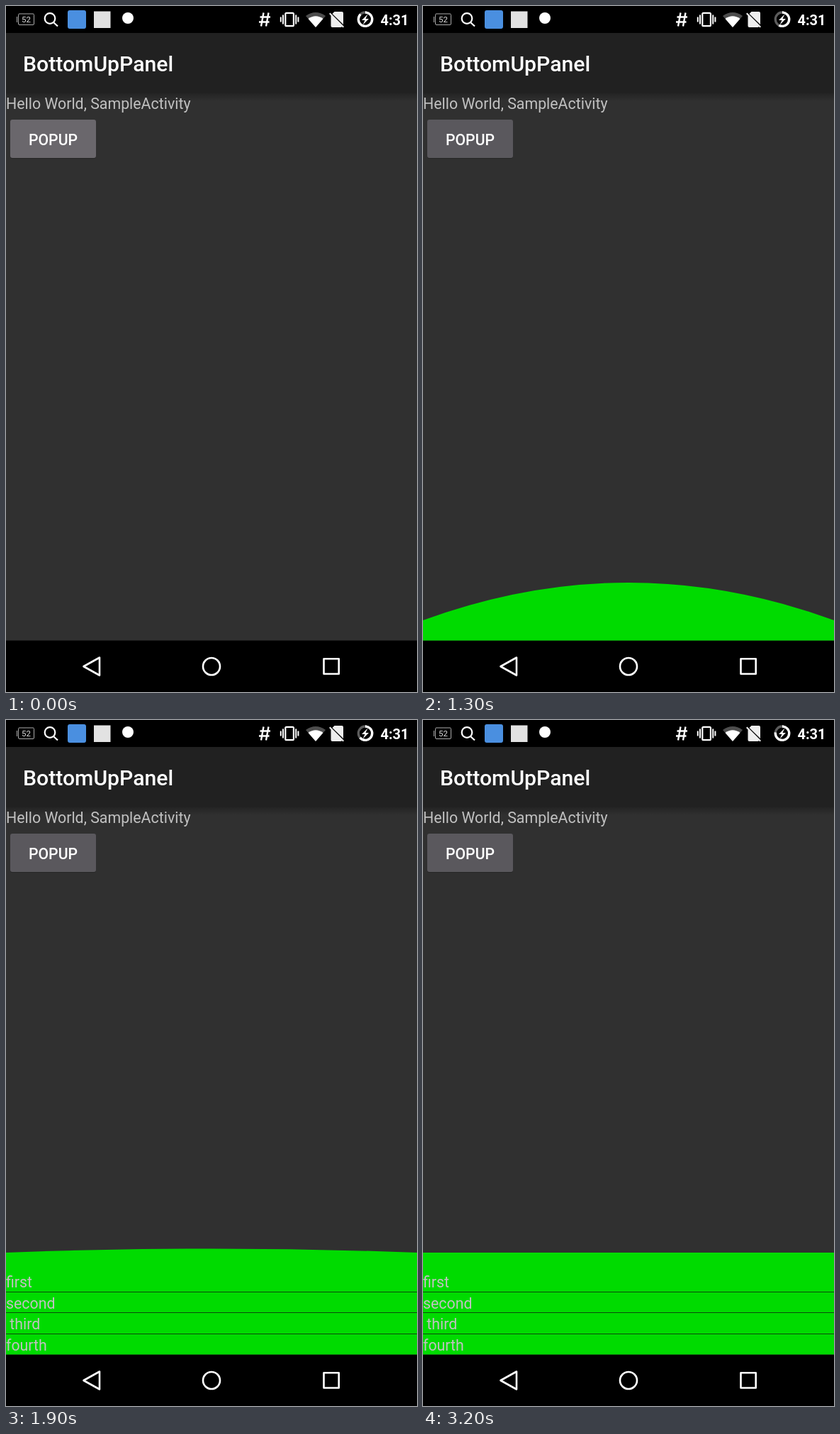
Recreate the animation shown at these times as an HTML page. Size 580 by 966 pixels, loop 3300 ms.

```html
<!DOCTYPE html>
<html lang="en">
<head>
<meta charset="utf-8">
<title>BottomUpPanel</title>
<style>
  html, body { margin: 0; width: 100%; height: 100%; overflow: hidden; background: #000; }
  svg { display: block; width: 580px; height: 966px; }
  text { font: 400 21.35px Roboto, sans-serif; fill: #c1c1c1; white-space: pre; }
  .medium { font-weight: 500; fill: #fff; }
  .title { font-size: 30.2px; }
  .label { font-size: 21.15px; }
  .clock { font-size: 20px; font-weight: 700; }
  .line { fill: none; stroke: #fff; }
  #button { animation: release 3.3s step-end infinite; }
  @keyframes release {
    0% { fill: #6a676c; }
    3.0303% { fill: #676569; }
    6.0606% { fill: #646266; }
    9.0909% { fill: #616062; }
    12.1212% { fill: #5e5d5f; }
    15.1515% { fill: #5b5b5b; }
    18.1818%, 100% { fill: #5a585d; }
  }
</style>
</head>
<body>
<svg viewBox="0 0 580 966">
  <defs>
    <linearGradient id="shade" x2="0" y2="1">
      <stop offset="0" stop-color="#242424"/>
      <stop offset="1" stop-color="#303030"/>
    </linearGradient>
    <clipPath id="content"><path d="M0 123H580V893.5H0z"/></clipPath>
  </defs>

  <rect width="580" height="966"/>
  <rect y="38" width="580" height="855.5" fill="#303030"/>
  <rect y="38" width="580" height="85" fill="#212121"/>
  <rect y="123" width="580" height="11" fill="url(#shade)"/>
  <text class="medium title" x="24" y="92">BottomUpPanel</text>
  <text x="0" y="145">Hello World, SampleActivity</text>
  <rect x="6" y="161" width="121" height="54" rx="3" fill="#262626"/>
  <rect id="button" x="6" y="160" width="121" height="54" rx="3"/>
  <text class="medium label" x="32" y="195.5">POPUP</text>

  <g clip-path="url(#content)">
    <g id="panel">
      <path id="sheet" fill="#00db00"/>
      <g id="rows"></g>
    </g>
  </g>

  <!-- status bar -->
  <rect class="line" x="17.5" y="11" width="22" height="15.5" rx="1.5" style="stroke:#aaa"/>
  <path class="line" d="M15.5 15v8" style="stroke:#aaa"/>
  <text x="28.5" y="23" text-anchor="middle" style="font-size:11.5px;fill:#ddd">52</text>
  <g class="line" stroke-width="2.2">
    <circle cx="62" cy="17.5" r="7.3"/>
    <path d="M67 23l6 5.5"/>
  </g>
  <rect x="87" y="6" width="26" height="26" rx="3" fill="#4a8fe0"/>
  <rect x="124" y="7.5" width="23.5" height="23.5" fill="#e2e2e2"/>
  <circle cx="172" cy="17" r="8" fill="#fff"/>
  <path class="line" stroke-width="2.4" d="M363.5 9.5l-3.5 19M370.5 9.5l-3.5 19M358.5 15.5h14.5M357 22.5h14.5"/>
  <rect class="line" stroke-width="2.2" x="394.3" y="9.8" width="11.6" height="18.4" rx="1.5"/>
  <path class="line" stroke-width="2" d="M391 12.5v13M387.8 15.5v7M409.2 12.5v13M412.4 15.5v7"/>
  <path d="M423 14Q437 4 451 14L437 30z" fill="#4d4d4d"/>
  <path d="M426.5 18Q437 10.5 447.5 18L437 30z" fill="#fff"/>
  <path d="M463.5 8H474Q476 8 476 10V26L460.5 11zM457.5 9.5L477 29l-1.5 1.5-1.5-1.500Q473.500 30 472.500 30H460.500Q458.500 30 458.500 28V13.500L456 11z" fill="#eee"/>
  <g class="line" stroke-width="3.3">
    <circle cx="507" cy="18.7" r="9.7" style="stroke:#5c5c5c"/>
    <circle id="charge" cx="507" cy="18.7" r="9.7" pathLength="100" transform="rotate(-90 507 18.7)"/>
  </g>
  <path d="M510.5 11.500l-8.500 8.500h4.500l-3 6.500 8.500-8.500h-4.500z" fill="#fff"/>
  <text class="medium clock" x="528.5" y="26.5">4:31</text>

  <!-- navigation bar -->
  <g class="line" stroke-width="2.6" stroke-linejoin="round">
    <path d="M132 917.5v25L109.500 930z"/>
    <circle cx="290" cy="930" r="12"/>
    <rect x="448.5" y="919.3" width="21.2" height="21.2"/>
  </g>
</svg>
<script>
const LOOP = 3300, STEP = 100;
const EDGE = 750, BULGE = 53, HIDDEN = 197, PITCH = 29.5;
const RISE_START = 1062, RISE_TIME = 533;
const SPRING_START = 1640, SPRING_END = 3150;
const el = id => document.getElementById(id);

el('rows').innerHTML = ['first', 'second', ' third', 'fourth'].map((word, i) => {
  const y = 799 + i * PITCH;
  const divider = i < 3 ? `<rect y="${805 + Math.floor(i * PITCH)}" width="580" height="1" fill="#0b4a0b"/>` : '';
  return `<text x="0" y="${y}">${word}</text>${divider}`;
}).join('');

// Distance of the panel below its resting place
function drop(t) {
  const p = Math.min(1, Math.max(0, (t - RISE_START) / RISE_TIME));
  return Math.round(HIDDEN * (1 + Math.cos(Math.PI * p)) / 2);
}

// Height of the top edge's middle above its ends: a damped spring
function bend(t) {
  if (t < SPRING_START) return BULGE;
  if (t > SPRING_END) return 0;
  const s = t - 1905;
  return -102 * Math.exp(-0.0023 * s) * Math.sin(2 * Math.PI * s / 580);
}

// Lit share of the battery ring, in percent
function charge(t) {
  return t < 700 ? 88 + t / 60 : 52 + (t - 700) / 100;
}

function draw(now) {
  const t = Math.floor(now % LOOP / STEP) * STEP;
  el('panel').setAttribute('transform', `translate(0 ${drop(t)})`);
  el('sheet').setAttribute('d', `M0 ${EDGE}Q290 ${EDGE - 2 * bend(t)} 580 ${EDGE}V1000H0z`);
  el('charge').setAttribute('stroke-dasharray', `${charge(t)} 100`);
}

const start = performance.now();
function tick() {
  draw(performance.now() - start);
  requestAnimationFrame(tick);
}
tick();
</script>
</body>
</html>
```
